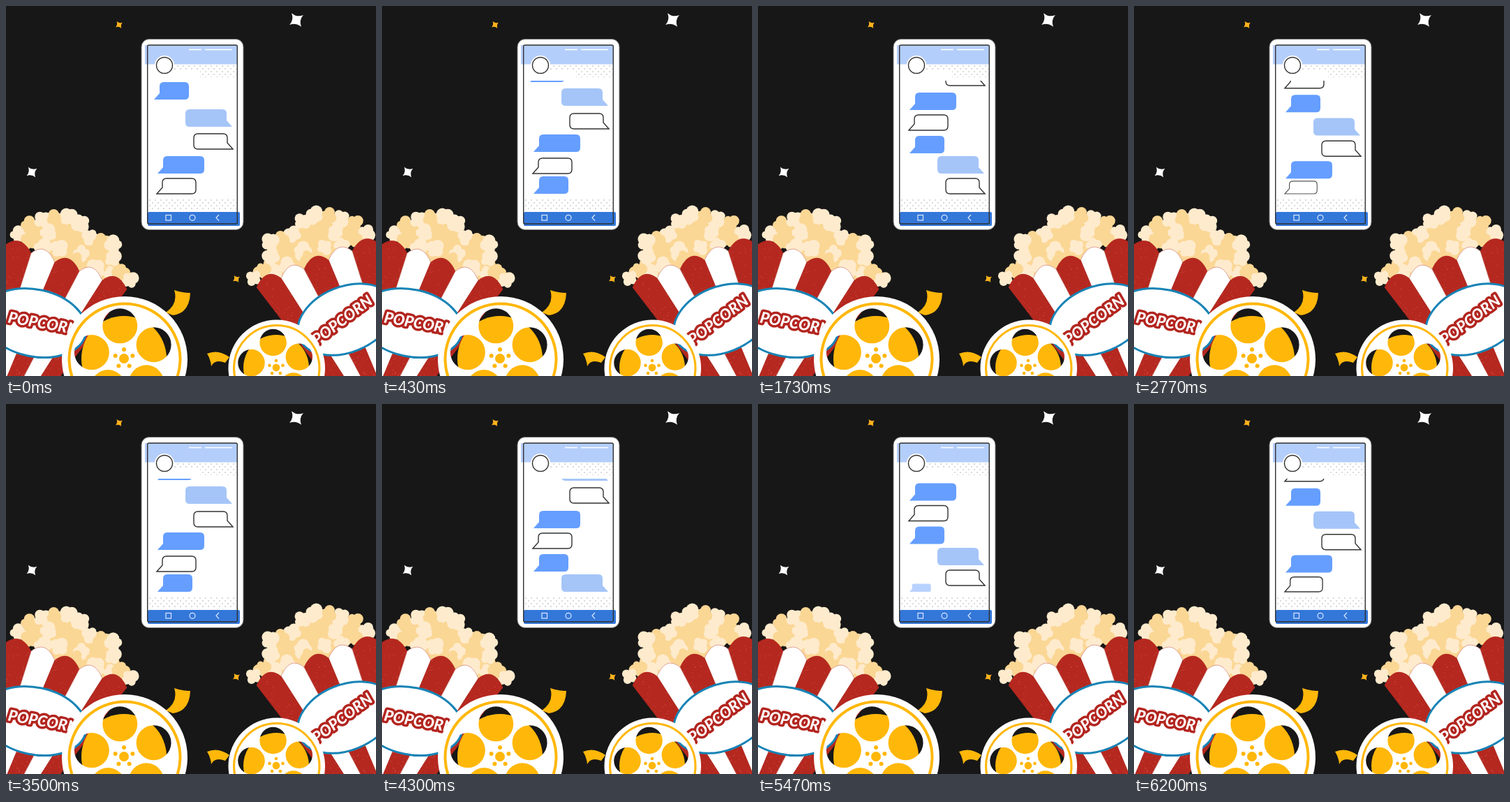
An HTML page that plays this animation: 530 by 530 pixels, repeating every 6230 ms.

```html
<!DOCTYPE html>
<html lang="en">
<head>
<meta charset="utf-8">
<title>Movie chat</title>
<style>
  html, body { margin: 0; width: 100%; height: 100%; overflow: hidden; background: #171717; }
  svg { display: block; width: 100vw; height: 100vh; }
  text {
    font: italic 800 22px Lato, "Open Sans", sans-serif;
    fill: #fff; stroke: #b3251f; stroke-width: 7; stroke-linejoin: round;
    paint-order: stroke; text-anchor: middle;
  }
</style>
</head>
<body>
<svg viewBox="0 0 530 530" xmlns="http://www.w3.org/2000/svg">
  <defs>
    <clipPath id="chatArea"><rect x="204" y="107" width="127" height="187"/></clipPath>
    <pattern id="dots" width="8" height="8" patternUnits="userSpaceOnUse">
      <circle cx="2" cy="2" r=".7" fill="#999"/><circle cx="6" cy="6" r=".7" fill="#999"/>
    </pattern>
  </defs>
  <rect width="530" height="530" fill="#171717"/>
  <g id="stars"></g>

  <g id="phone">
    <rect x="194" y="47.5" width="146" height="273" rx="11" fill="#fff" stroke="#777"/>
    <rect x="199" y="56" width="132" height="27.500" fill="#b4cefb"/>
    <path d="M262 62.500H280M285 62.500H324" stroke="#fff" stroke-width="1.500"/>
    <rect x="240" y="85" width="90" height="8" fill="url(#dots)"/>
    <rect x="278" y="93" width="52" height="9" fill="url(#dots)"/>
    <rect x="205" y="277" width="125" height="16" fill="url(#dots)"/>
    <g id="chat" clip-path="url(#chatArea)"></g>
    <rect x="203" y="295" width="132" height="20" rx="2" fill="#3377d9"/>
    <g fill="none" stroke="#dce9ff" stroke-width="1.200">
      <rect x="229" y="299.500" width="7.500" height="7.500"/>
      <circle cx="267" cy="303.300" r="4"/>
      <path d="M305 299L301 303.300L305 307.500"/>
    </g>
    <rect x="202.700" y="56" width="128.600" height="256" rx="2" fill="none" stroke="#303030" stroke-width="1.400"/>
    <circle cx="227" cy="85" r="14" fill="#fff"/>
    <circle cx="227" cy="85" r="11.500" fill="#fff" stroke="#333" stroke-width="1.400"/>
  </g>

  <g id="left"></g>
  <g id="right" transform="matrix(-1 0 0 1 532 -3)"></g>

  <g id="labels" stroke="#1683b5" stroke-width="3" fill="#fff">
    <ellipse cx="41" cy="454" rx="75" ry="48" transform="rotate(12 41 454)"/>
    <ellipse cx="487" cy="449" rx="72" ry="47" transform="rotate(-22 487 449)"/>
  </g>
  <text transform="translate(52 462) rotate(10)">POPCORN</text>
  <text transform="translate(486 456) rotate(-37)">POPCORN</text>

  <g fill="#ffb70a">
    <path d="M241 407Q252 411 264 411Q263 440 239 443L229 439Q247 426 241 407Z"/>
    <path d="M288 498Q304 491 320 503L314 511Q299 505 294 516Q293 505 288 498Z"/>
  </g>
  <g id="reels"></g>
</svg>
<script>
const LOOP = 6230;
const get = id => document.getElementById(id);

function add(parent, tag, attrs) {
  const el = document.createElementNS("http://www.w3.org/2000/svg", tag);
  for (const key in attrs) el.setAttribute(key, attrs[key]);
  parent.appendChild(el);
  return el;
}
const disc = (parent, cx, cy, r, fill) => add(parent, "circle", { cx, cy, r, fill });

let seed = 7;
const random = () => (seed = seed * 16807 % 2147483647) / 2147483647;

// Four-pointed sparkles
for (const [x, y, r, fill] of [
  [416, 20, 12, "#fff"], [37, 238, 9, "#fff"], [162, 27, 6, "#ffb21c"], [330, 391, 6, "#ffb21c"]
]) {
  add(get("stars"), "path", {
    d: "M0-1Q.2-.2 1 0Q.2.2 0 1Q-.2.2-1 0Q-.2-.2 0-1Z", fill,
    transform: `translate(${x} ${y}) rotate(-35) scale(${r})`
  });
}

// Popcorn: loose kernels above a striped, tapering bucket
const kernels = [
  [17, 328], [33, 314], [52, 307], [71, 304], [90, 303], [107, 311], [34, 338], [60, 326],
  [84, 326], [52, 345], [76, 348], [101, 333], [121, 331], [138, 338], [154, 342], [108, 354],
  [130, 356], [152, 362], [98, 364], [128, 376], [150, 384], [165, 382], [177, 393]
];
const rim = [[-2, 343], [36, 354], [70, 367], [105, 380], [138, 393], [173, 406]];
const vanish = [-89, 748];
const toward = ([x, y], k) => [x + (vanish[0] - x) * k, y + (vanish[1] - y) * k];

function bucket(parent) {
  add(parent, "path", { d: "M14 330L48 302L96 302L122 328L156 344L168 390L160 400L90 380Z", fill: "#fbd795" });
  kernels.forEach(([x, y], i) => {
    const fill = i % 5 === 1 || i % 5 === 3 ? "#fbd795" : "#feebcd";
    const turn = random() * 6;
    for (let j = 0; j < 4; j++) {
      const a = turn + j * 1.6;
      disc(parent, x + 6 * Math.cos(a), y + 6 * Math.sin(a), 4.5 + random() * 4.5, fill);
    }
    disc(parent, x, y, 8.5, fill);
  });
  for (let i = 0; i < 5; i++) {
    const a = rim[i], b = rim[i + 1];
    const red = i % 2 === 0;
    add(parent, "path", {
      d: `M${a}Q${(a[0] + b[0]) / 2 + 4} ${(a[1] + b[1]) / 2 - 23} ${b}L${toward(b, .55)}L${toward(a, .55)}Z`,
      fill: red ? "#b5281f" : "#fff", stroke: red ? "#b5281f" : "#c9655b", "stroke-width": .6
    });
    for (let n = 0; red && n < 90; n++) {
      const k = random();
      const [x, y] = toward([a[0] + (b[0] - a[0]) * k, a[1] + (b[1] - a[1]) * k], random() * .5);
      disc(parent, x, y, .5, "#d0625a");
    }
  }
}
bucket(get("left"));
bucket(get("right"));

// Film reels: a roll of film behind a plate with five open holes
const circlePath = (x, y, r) => `M${x - r} ${y}a${r} ${r} 0 1 0 ${2 * r} 0a${r} ${r} 0 1 0 ${-2 * r} 0Z`;

function reel(x, y, scale) {
  const g = add(get("reels"), "g", { transform: `translate(${x} ${y}) scale(${scale})` });
  const around = (radius, from) => Array.from({ length: 5 }, (_, i) => {
    const a = (from + 72 * i) * Math.PI / 180;
    return [radius * Math.cos(a), radius * Math.sin(a)];
  });
  disc(g, 0, 0, 61, "#ffb70a");
  add(g, "path", {
    d: circlePath(1, 1, 90) + around(47, -97).map(([hx, hy]) => circlePath(hx, hy, 25)).join(""),
    fill: "#fff", "fill-rule": "evenodd"
  });
  add(g, "circle", { cx: 1, cy: 1, r: 79.5, fill: "none", stroke: "#ffb70a", "stroke-width": 4 });
  disc(g, 0, 0, 7, "#ffb70a");
  for (const [dx, dy] of around(13, -90)) disc(g, dx, dy, 3, "#ffb70a");
}
reel(169, 505, 1);
reel(387, 518, .77);

// Chat: x of the tail tip, width, height, direction, colour (none = outline), bottom edge per slot
const kinds = [
  [217, 50, 25, 1, "#659eff", [269, 240, 211, 177, 144, 109]],
  [324, 67, 25, -1, "#a5c5f8", [269, 240, 211, 177, 143, 110]],
  [325, 56, 22, -1, "", [269, 240, 207, 176, 142, 114]],
  [217, 67, 25, 1, "#659eff", [269, 240, 209, 178, 149, 115]],
  [216, 56, 22, 1, "", [269, 240, 207, 178, 144, 109]]
];
const bubbles = [];
for (let n = 0; n < 15; n++) {
  const [x, w, h, dir, fill, slots] = kinds[n % 5];
  const el = add(get("chat"), "path", {
    d: `M0 0L8-9V${6 - h}Q8 ${-h} 14 ${-h}H${w - 6}Q${w} ${-h} ${w} ${6 - h}V-6Q${w} 0 ${w - 6} 0Z`,
    fill: fill || "#fff", stroke: fill ? "none" : "#333", "stroke-width": 1.4
  });
  bubbles.push({ el, x, dir, slots: [...slots, 70] });
}
// The opening layout is a little looser
bubbles[0].x -= 5;
bubbles[0].slots[4] = 134;
bubbles[1].slots[3] = 173;
bubbles[2].slots[2] = 205;

const clamp = (v, lo, hi) => Math.min(hi, Math.max(lo, v));
const stepStart = k => 30 + 633.5 * k + (k > 6 ? 236 : 0);
const stepProgress = (k, t) => clamp((t - stepStart(k) - 50) / 190, 0, 1);

function draw(t) {
  let scrolled = 0;
  for (let k = 0; k < 10; k++) scrolled += stepProgress(k, t) ** 1.5;
  bubbles.forEach(({ el, x, dir, slots }, n) => {
    const size = n < 5 ? 1 : stepProgress(n - 5, t);
    const age = clamp(4 - n + scrolled, 0, 6);
    const i = Math.min(5, Math.floor(age));
    const y = slots[i] + (slots[i + 1] - slots[i]) * (age - i);
    el.setAttribute("transform", `translate(${x} ${y}) scale(${dir * size} ${size})`);
    el.setAttribute("opacity", size);
  });
}

const origin = performance.now();
function frame() {
  draw((performance.now() - origin) % LOOP);
  requestAnimationFrame(frame);
}
frame();
</script>
</body>
</html>
```
